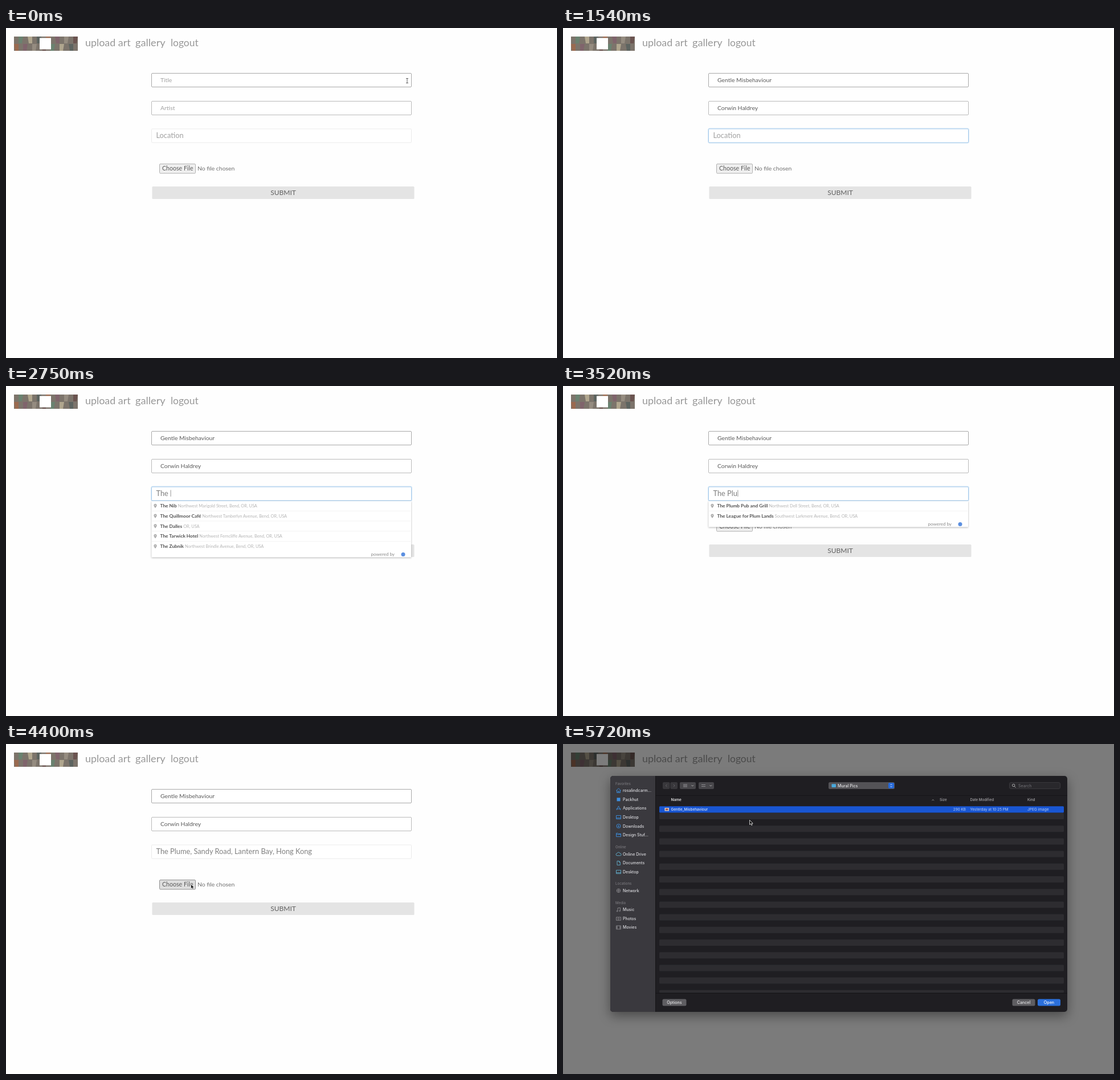
An HTML page for the animation above (5830 ms loop, 967x579 px).

```html
<!DOCTYPE html>
<html lang="en">
<head>
<meta charset="utf-8">
<title>Upload art</title>
<style>
html, body { margin: 0; width: 100%; height: 100%; overflow: hidden; background: #fefefe; }
svg { display: block; width: 100%; height: 100%; }
text { white-space: pre; }
.page { font-family: Lato, "Open Sans", sans-serif; }
.dialog { font-family: Inter, Roboto, sans-serif; }
.panel { filter: drop-shadow(0 7px 10px rgba(0,0,0,.4)); }
.drop { filter: drop-shadow(0 1px 1.5px rgba(0,0,0,.3)); }
</style>
</head>
<body>
<svg viewBox="0 0 967 579">
  <g id="page" class="page"></g>
  <g id="form" class="page"></g>
  <g id="dialog" class="dialog"></g>
  <g id="files" class="dialog"></g>
  <g id="pointer"></g>
</svg>
<script>
const TICK = 110, LOOP = 5830;
const TITLE = 'Gentle Misbehaviour', ARTIST = 'Corwin Haldrey';
const PLACE = 'The Plume, Sandy Road, Lantern Bay, Hong Kong';
const $ = id => document.getElementById(id);
const clamp = v => Math.max(0, Math.min(1, v));

const rect = (x, y, w, h, fill, more = '') =>
  `<rect x="${x}" y="${y}" width="${w}" height="${h}" fill="${fill}" ${more}/>`;
const text = (x, y, size, fill, str, more = '') =>
  `<text x="${x}" y="${y}" font-size="${size}" fill="${fill}" ${more}>${str}</text>`;
const line = (d, color, w = 1) =>
  `<path d="${d}" fill="none" stroke="${color}" stroke-width="${w}" stroke-linejoin="round"/>`;
const at = (x, y, s) => `<g transform="translate(${x} ${y})">${s}</g>`;
const BOLD = 'font-weight="700"', SEMI = 'font-weight="500"';
const MID = 'text-anchor="middle"', END = 'text-anchor="end"';

// ---- page header ----
function banner() {
  const tones = ['#9a6a50', '#5d6460', '#b0a68e', '#6a8270', '#6b5450', '#958c80', '#80646c'];
  let s = rect(14, 15, 112, 25, '#7c746b');
  for (let i = 0; i < 14; i++) {
    const x = 14 + i * 8, y = i % 2 ? 15 : 28;
    s += `<path d="M${x} ${y}h8l${i % 3 ? -2 : 0} 12h-6z" fill="${tones[i * 3 % 7]}"/>`;
  }
  return s + rect(59, 17.5, 20, 20, '#fff');
}
$('page').innerHTML = banner() +
  text(139, 32.4, 17.9, '#989898', 'upload art') +
  text(227, 32.4, 18.2, '#989898', 'gallery') +
  text(289, 32.4, 17.4, '#989898', 'logout');

// ---- upload form ----
const ROWS = [
  ['The Nib', 'Northwest Marigold Street, Bend, OR, USA'],
  ['The Quillmoor Café', 'Northwest Tamberlyn Avenue, Bend, OR, USA'],
  ['The Dalles', 'OR, USA'],
  ['The Tarwick Hotel', 'Northwest Ferncliffe Avenue, Bend, OR, USA'],
  ['The Zubnik', 'Northwest Brindle Avenue, Bend, OR, USA']
];
const FEWER = [
  ['The Plumb Pub and Grill', 'Northwest Dell Street, Bend, OR, USA'],
  ['The League for Plum Lands', 'Southwest Larkmere Avenue, Bend, OR, USA']
];

function suggestions(rows) {
  const h = rows.length * 17.7 + 10;
  let s = rect(255.5, 202, 455.5, h, '#fff', 'class="drop"');
  rows.forEach(([name, address], i) => {
    const y = 210.2 + i * 17.75;
    s += `<path d="M262 ${y + 4}c-1-2-2.6-3-2.6-4.8a2.6 2.6 0 0 1 5.2 0c0 1.8-1.6 2.8-2.6 4.8z" fill="#aaa"/>` +
      `<circle cx="262" cy="${y - .8}" r=".9" fill="#eee"/>` +
      text(270.5, y + 2.8, 8.3, '#505050',
        `<tspan ${BOLD}>${name}</tspan><tspan dx="2" font-size="7.4" fill="#b4b4b4">${address}</tspan>`);
    if (i < rows.length - 1) s += rect(256, y + 8.6, 454, .8, '#f0f0f0');
  });
  return s + text(682, 202 + h - 2.5, 8, '#888', 'powered by', END) +
    `<circle cx="697" cy="${202 + h - 5}" r="3.5" fill="#5b8fe0"/>`;
}

function field(y, value, hint, border) {
  return rect(255.5, y, 456, 24, '#fff', `stroke="${border}" rx="1.5"`) +
    text(271, y + 15, 10.4, value ? '#5a5a5a' : '#a0a0a0', value || hint);
}

function placeAt(n) {
  if (n >= 35) return PLACE;
  const steps = [18, 19, 22, 23, 28, 29, 32, 33];
  return PLACE.slice(0, steps.filter(k => n >= k).length);
}

function drawForm(n) {
  const title = TITLE.slice(0, Math.round(TITLE.length * clamp((n - 1) / 6)));
  const artist = ARTIST.slice(0, ARTIST.length * clamp((n - 7) / 2));
  const place = placeAt(n), focused = n >= 10 && n < 37, hover = n >= 39;
  let s = field(79.5, title, 'Title', '#a9a9a9') + field(128.5, artist, 'Artist', '#bababa');
  if (focused) s += rect(255.5, 177, 456, 24, '#fff', 'stroke="#d6e7f6" stroke-width="3" rx="2"');
  s += rect(255.5, 177, 456, 24, '#fff', `stroke="${focused ? '#a5cbec' : '#ebebeb'}" rx="1.5"`) +
    text(263.5, 192.5, 12.8, place ? '#808080' : '#a0a0a0', place || 'Location', 'id="place"') +
    rect(269.5, 238.5, 63, 16.5, hover ? '#dedede' : '#efefef',
      `stroke="${hover ? '#909090' : '#b0b0b0'}" rx="1.5"`) +
    text(274, 249.9, 10.6, '#5a5a5a', 'Choose File') +
    text(336, 249.9, 10.4, '#707070', 'No file chosen') +
    rect(256.5, 278, 460, 22, '#e4e4e4', 'rx="1.5"') +
    text(486.5, 292.5, 12, '#606060', 'SUBMIT', MID);
  if (n >= 18 && n < 32) s += suggestions(ROWS);
  else if (n >= 32 && n < 35) s += suggestions(FEWER);
  $('form').innerHTML = s;

  const caret = focused && n < 35 && (n >= 16 || n < 12);
  if (caret) {
    const x = 264 + (place ? $('place').getComputedTextLength() : 0);
    $('form').insertAdjacentHTML('beforeend', rect(x, 182.5, .9, 11.5, '#8a8a8a'));
  }
}

// ---- file dialog ----
const BLUE = '#3d8fe0', TEAL = '#62b0d0', GREY = '#8b8a8e';
const ICONS = {
  home: 'M-4 0L0-4L4 0M-3-1V3.5H3V-1M-1 3.5V1H1V3.5',
  apps: 'M-3.5 3L0-4L3.5 3M-4 1H4',
  desk: 'M-4-3H4V3H-4zM-4 1.3H4',
  down: 'M-3.5 0a3.5 3.5 0 1 0 7 0a3.5 3.5 0 1 0-7 0M0-2V2M-1.5 .5L0 2L1.5 .5',
  folder: 'M-4-3H-1L0-2H4V3H-4zM-4-.8H4',
  cloud: 'M-2.5 2.5a2 2 0 0 1 0-4a2.6 2.6 0 0 1 5 .2a1.9 1.9 0 0 1 .5 3.8z',
  doc: 'M-2.5-3.5H.8L2.8-1.5V3.5H-2.5zM.8-3.5V-1.5H2.8',
  globe: 'M-3.2 0a3.2 3.2 0 1 0 6.4 0a3.2 3.2 0 1 0-6.4 0M-3 0H3M0-3V3',
  note: 'M-1.5 2.5V-3L3-3.5V2M-3.3 2.5a.9 .9 0 1 0 1.8 0a.9 .9 0 1 0-1.8 0M1.2 2a.9 .9 0 1 0 1.8 0a.9 .9 0 1 0-1.8 0',
  photo: 'M-4-2.5H4V3H-4zM-1.5 .3a1.5 1.5 0 1 0 3 0a1.5 1.5 0 1 0-3 0',
  film: 'M-4-3H4V3H-4zM-2.3-3V3M2.3-3V3M-4 0H-2.3M2.3 0H4'
};
const SIDEBAR = [
  [69.5, 'Favorites', [['rosalindcarm...', 'home'], ['Packhut', ''], ['Applications', 'apps'],
    ['Desktop', 'desk'], ['Downloads', 'down'], ['Design Stuf...', 'folder']], BLUE],
  [181, 'Online', [['Online Drive', 'cloud'], ['Documents', 'doc'], ['Desktop', 'desk']], TEAL],
  [245, 'Locations', [['Network', 'globe']], GREY],
  [278.5, 'Media', [['Music', 'note'], ['Photos', 'photo'], ['Movies', 'film']], GREY]
];

function sidebar() {
  return SIDEBAR.map(([y, head, items, color]) =>
    text(92, y + 2, 6.1, '#77767b', head, SEMI) +
    items.map(([name, icon], i) => {
      const iy = y + 12.3 + i * 15.55;
      const mark = icon ? line(ICONS[icon], color, .9) : rect(-3, -3, 6, 6, color);
      return at(97.5, iy, mark) + text(105, iy + 2.5, 7, '#dcdce0', name, SEMI);
    }).join('')).join('');
}

function button(x, w, label, fill, color) {
  return rect(x, 447.5, w, 12, fill, 'rx="2.5"') +
    text(x + w / 2, 456.2, 7.1, color, label, `${MID} ${SEMI}`);
}

function dialog() {
  let s = rect(0, 0, 967, 579, '#000', 'opacity=".515"') +
    rect(83, 56, 802, 414, '#1f1e22', 'rx="5" class="panel"') +
    '<path d="M162 56H88a5 5 0 0 0-5 5V465a5 5 0 0 0 5 5H162z" fill="#3a393e"/>' +
    rect(162, 56, 1, 414, '#151417') + sidebar();
  // toolbar
  for (const [x, w, fill] of [[175, 12.5, '#38373b'], [188.5, 12.5, '#38373b'], [205, 28, '#47464a'], [238, 27, '#47464a']])
    s += rect(x, 67, w, 12, fill, 'rx="2"');
  s += line('M182.5 70.8L180.3 73L182.5 75.2M193.8 70.8L196 73L193.8 75.2', '#68676b', .9) +
    line('M211 71H218M211 73H218M211 75H218M243 71.5H250M243 74.5H250', '#8d8c90', 1.1) +
    line('M225.5 72.2L227.3 74L229.1 72.2M257.5 72.2L259.3 74L261.1 72.2', '#bbb', .9) +
    rect(466, 67, 116, 12, '#545357', 'rx="2.5"') +
    rect(471.5, 70.2, 7.5, 5.8, '#48a9dc', 'rx="1"') +
    text(482, 75.5, 7.1, '#e6e6e8', 'Mural Pics', SEMI) +
    rect(571, 68, 10, 10, '#2468d8', 'rx="2"') +
    line('M574.5 72L576 70.5L577.5 72M574.5 74L576 75.5L577.5 74', '#fff', .8) +
    rect(783.5, 67.5, 89, 11, '#29282c', 'rx="2.5" stroke="#39383c"') +
    line('M788.5 72.5a2.2 2.2 0 1 0 4.4 0a2.2 2.2 0 1 0-4.4 0M792.3 74.3L794.5 76.5', '#bbb', .9) +
    text(799, 75.5, 7.1, '#747378', 'Search') +
    rect(163, 90, 722, .8, '#151417');
  // list
  s += text(189.5, 100.4, 6.5, '#e2e2e4', 'Name', 'font-weight="600"') +
    line('M647.5 99.3L649.3 97.5L651.1 99.3', '#aaa', .8);
  for (const [x, label] of [[661, 'Size'], [714.5, 'Date Modified'], [815, 'Kind']])
    s += text(x, 100.4, 6.2, '#a8a7ab', label, SEMI);
  for (let i = 0; i < 15; i++) {
    const y = 121 + i * 22.2;
    s += rect(169, y, 710, Math.min(11, 436.5 - y), '#2d2c30', 'rx="1.5"');
  }
  return s + rect(163, 436.8, 722, .8, '#131215') +
    button(174.5, 42, 'Options', '#5f5e62', '#e6e6e8') +
    button(788.5, 40, 'Cancel', '#5f5e62', '#e6e6e8');
}
$('dialog').innerHTML = dialog();

function drawFiles(n) {
  const on = n >= 49, main = on ? '#dbe6fb' : '#5d5c60', side = on ? '#b9cef5' : '#58575b';
  $('files').innerHTML = (on ? rect(169, 109.3, 710, 11.2, '#1956d2', 'rx="1.5"') : '') +
    rect(178.5, 112, 7.5, 5.5, on ? '#d9cfc8' : '#77645f') +
    rect(180, 113.2, 4.5, 3, on ? '#a5564a' : '#4c3b39') +
    text(189.5, 117.2, 6.4, main, TITLE.replace(' ', '_'), SEMI) +
    text(707, 117.2, 6.4, side, '290 KB', END) +
    text(714.5, 117.2, 6.4, side, 'Yesterday at 10:25 PM') +
    text(815, 117.2, 6.6, side, 'JPEG image') +
    button(833, 40, 'Open', on ? '#2b70dc' : '#38373b', on ? '#fff' : '#68676b');
}

// ---- mouse pointer ----
const ARROW = '<path d="M0 0V8L1.9 6.3L3.3 9.2L4.7 8.5L3.4 5.8H5.8z" fill="#111" stroke="#eee" stroke-width=".8"/>';
const BEAM = line('M-2-4H2M0-4V4M-2 4H2', '#555', .9);

function pointer(n) {
  if (n < 2) return at(704, 92.5, BEAM);
  if (n < 38) return '';
  if (n < 42) {
    const k = clamp((n - 38) / 2);
    return at(318 + 6.5 * k, 235 + 11 * k, ARROW);
  }
  const k = clamp((n - 48) / 2);
  return at(316.5 + 11 * k, 117.5 + 16 * k, ARROW);
}

let last = -1;
function frame(now) {
  const n = Math.floor(now % LOOP / TICK);
  if (n !== last) {
    last = n;
    drawForm(n);
    drawFiles(n);
    $('dialog').style.display = $('files').style.display = n >= 42 ? '' : 'none';
    $('pointer').innerHTML = pointer(n);
  }
  requestAnimationFrame(frame);
}
frame(performance.now());
</script>
</body>
</html>
```
